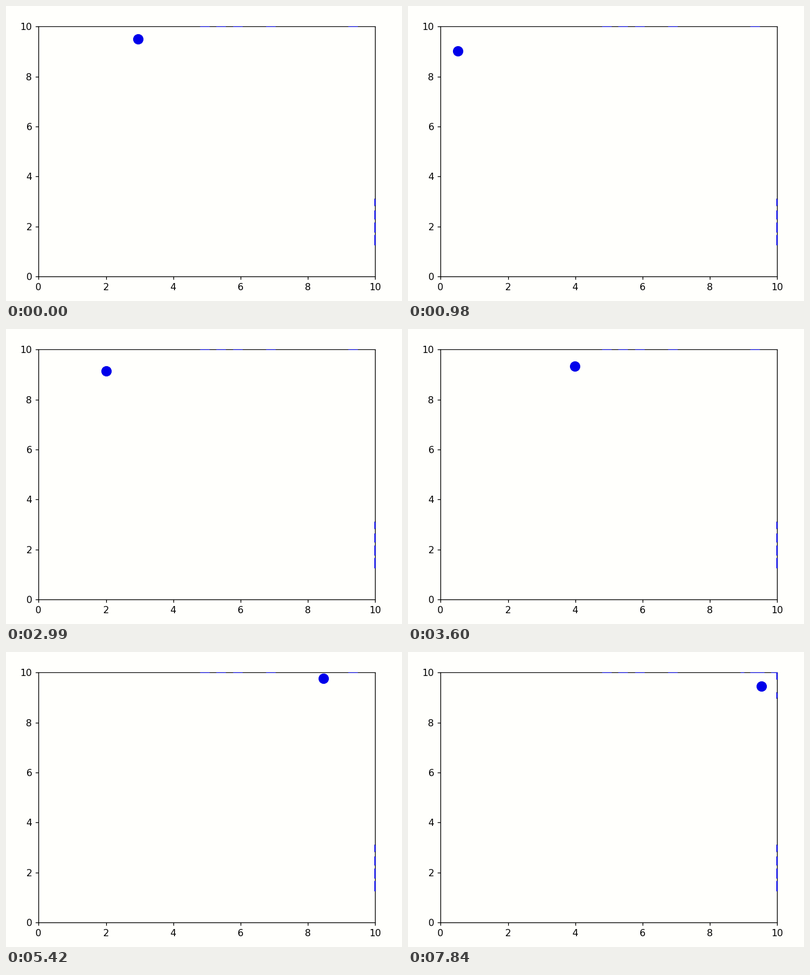
A matplotlib script that plays this animation: 660 px wide and 492 px high, repeating every 8 s.

```python
import matplotlib.pyplot as plt
import numpy as np
from matplotlib.animation import FuncAnimation
from matplotlib.patches import Rectangle

W, H = 660, 492
LOOP, INTERVAL = 8000, 40
STEP, LEAD = 201.7, 60          # ms per walk step, time already elapsed at t = 0
SPEED = 0.5                     # distance per step
K = 1.13                        # scale of all point sizes
PAPER, BLUE = "#fffffc", "#0000ea"
LEFT, RIGHT, TOP, BOTTOM = 54.4, 614.9, 34.04, 451.4

# The ball walks straight from wall to wall and waits there for a new heading.
CORNERS = np.array([(2.96, 9.50), (0.01, 8.93), (9.96, 9.92),
                    (9.465, 9.99), (9.865, 9.08), (9.537, 9.453)])
WAITS = [4, 1, 1, 3, 0]


def build_walk():
    walk = [CORNERS[0]]
    for a, b, wait in zip(CORNERS, CORNERS[1:], WAITS):
        steps = round(np.hypot(*(b - a)) / SPEED)
        walk += [a + (b - a) * s / steps for s in range(1, steps + 1)]
        walk += [b] * wait
    return np.array(walk)


def past_hits():
    """Wall contacts from before the loop: along the top, down the right side."""
    top = [(4.93 + 0.49 * k, 9.92) for k in (0, 1, 2, 4, 9)]
    side = np.linspace((9.87, 2.97), (9.98, 1.48), 4)
    return np.vstack([top, side])


plt.rcParams.update({
    "font.family": "DejaVu Sans", "font.size": 10 * K,
    "axes.linewidth": 0.8 * K,
    **{f"{a}tick.major.{p}": v * K for a in "xy"
       for p, v in (("size", 3.5), ("width", 0.8), ("pad", 3.5))},
})

fig = plt.figure(figsize=(W / 100, H / 100), dpi=100, facecolor=PAPER)
ax = fig.add_axes([LEFT / W, 1 - BOTTOM / H,
                   (RIGHT - LEFT) / W, (BOTTOM - TOP) / H], facecolor=PAPER)
ax.set(xlim=(0, 10), ylim=(0, 10),
       xticks=range(0, 11, 2), yticks=range(0, 11, 2))

# Old balls are wiped from the inside and survive only on the top and right edge.
dot = dict(marker="o", ls="", color=BLUE, ms=10 * K, mew=K)
trail, = ax.plot([], [], zorder=3, **dot)
ax.add_patch(Rectangle((55, H - 451), 614 - 55, 451 - 35, transform=None,
                       color=PAPER, lw=0, antialiased=False, zorder=3.2))
ax.spines["left"].set_zorder(3.5)
ax.spines["bottom"].set_zorder(3.5)
ball, = ax.plot([], [], zorder=4, **dot)

walk, hits = build_walk(), past_hits()


def draw(i):
    n = int((i * INTERVAL + LEAD) / STEP)
    ball.set_data(*walk[n:n + 1].T)
    trail.set_data(*np.vstack([hits, walk[:n + 1]]).T)
    return trail, ball


anim = FuncAnimation(fig, draw, frames=LOOP // INTERVAL, interval=INTERVAL,
                     init_func=lambda: draw(0), repeat=True, repeat_delay=0)
plt.show()
```
